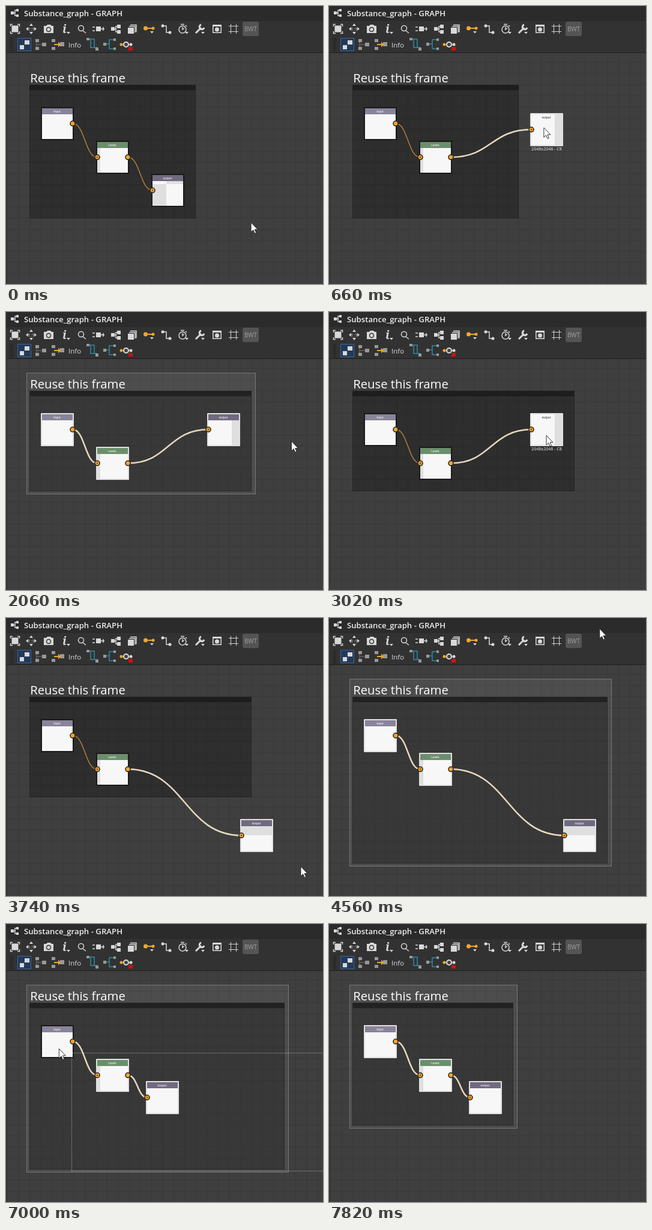
These frames come from a looping animation (528 by 462 pixels, 7.84 s). An HTML page:

```html
<!DOCTYPE html>
<html lang="en">
<head>
<meta charset="utf-8">
<style>
  html, body { margin: 0; width: 528px; height: 462px; overflow: hidden; background: #3f3f3f; }
  svg { display: block; font-family: "Open Sans", "Noto Sans", sans-serif; }
  .line { fill: none; stroke: #d8d8d8; stroke-width: 1.5; }
  .bold { stroke-width: 3; }
  .fill { fill: #d8d8d8; }
  .dim { fill: #999; }
  .cyan { fill: none; stroke: #2d8ca3; stroke-width: 1.5; }
  .amber { fill: #f0a72c; stroke: #f0a72c; stroke-width: 2; }
</style>
</head>
<body>
<svg width="528" height="462" viewBox="0 0 528 462">
  <defs>
    <pattern id="grid" x="2" y="1" width="18.46" height="18.46" patternUnits="userSpaceOnUse">
      <path d="M0 .5H18.46M.5 0V18.46" stroke="#383838"/>
    </pattern>
    <path id="menu" class="fill" d="M-3 0h6l-3 3.5z"/>
    <circle id="dot" r="2.5"/>
  </defs>
  <rect width="528" height="462" fill="#3f3f3f"/>
  <rect width="528" height="462" fill="url(#grid)"/>
  <path d="M.5 78V462" stroke="#2b2b2b"/>

  <g id="toolbar">
    <rect width="528" height="78" fill="#323232"/>
    <rect width="528" height="25" fill="#2b2b2b"/>
    <path d="M0 77.5H528" stroke="#1d1d1d"/>
    <path class="fill" d="M8 9h5v5h-5zM17 5h4v4h-4zM17 14h4v4h-4z"/>
    <path class="line" d="M12 11.5h3M19 7h-4v9h4"/>
    <text x="30" y="17" font-size="13.2" font-weight="600" fill="#eee">Substance_graph - GRAPH</text>

    <path class="line" d="M7.5 34v-3.5h3.5M19 30.5h3.5v3.5M22.5 42v3.5h-3.5M11 45.5h-3.5v-3.5"/>
    <path class="fill" d="M9.5 32.5h11v11h-11z"/>
    <path class="fill" d="M33 38l4-3v6zM51 38l-4-3v6zM42 29l3 4h-6zM42 47l3-4h-6z"/>
    <text x="42" y="41" font-size="8" text-anchor="middle" class="fill">1:1</text>
    <path class="fill" d="M63 33h4l2-2h5l2 2h3v12h-16z"/>
    <circle cx="71" cy="39" r="3.5" class="fill" stroke="#323232" stroke-width="1.5"/>
    <text x="94" y="45" font-family="Noto Serif, serif" font-size="19" font-style="italic" font-weight="600" class="fill">i</text>
    <use href="#menu" x="104" y="43"/>
    <path class="line" d="M128 41l5 4"/><circle cx="125" cy="37" r="4.5" class="line"/>
    <path class="fill" d="M150 34h8v8h-8z"/>
    <path class="line" d="M144 35h4M144 41h4M158 38h6M162 35v6"/>
    <path class="fill" d="M175 35h6v6h-6zM185 31h6v6h-6zM185 40h6v6h-6z"/>
    <path class="line" d="M181 38h3M186 34h-3v9h3"/>
    <path class="fill" d="M203 36h10v10h-10z"/>
    <path class="line" d="M205 34h10v10M207 31.5h10v12"/>
    <path class="amber" d="M232 37h13"/>
    <use href="#dot" x="232.5" y="37" class="amber" stroke-width="0"/>
    <use href="#dot" x="245" y="37" fill="#f0a72c"/>
    <use href="#menu" x="243" y="42"/>
    <path class="line" d="M261 33h6v11h6"/>
    <use href="#dot" x="261" y="33" class="fill"/><use href="#dot" x="273" y="44" class="fill"/>
    <circle cx="294" cy="39" r="6" class="line"/>
    <path class="line" d="M294 35v4l3-2M291 30.5h6M299 32l2 2"/>
    <use href="#menu" x="301" y="43"/>
    <path class="line bold" d="M316 45l9-9M325 31a4 4 0 1 0 5 5"/>
    <use href="#menu" x="328" y="43"/>
    <path class="fill" d="M344 31h15v14h-15z"/><path d="M345.5 34h12v9.5h-12z" fill="#3a3a3a"/>
    <circle cx="351.5" cy="39" r="3.5" class="fill"/>
    <path d="M374.5 30v16M383.5 30v16M371 33.5h16M371 42.5h16" stroke="#d0d0d0"/>
    <rect x="394" y="26" width="27" height="24" rx="3" fill="#545454"/>
    <text x="407.5" y="41.5" font-size="10" text-anchor="middle" fill="#a0a0a0">BWT</text>

    <path d="M8 53v23M11 53v23" stroke="#171717" stroke-dasharray="1.5 1"/>
    <rect x="19.5" y="53.5" width="22" height="21" fill="#23395a" stroke="#3b659d"/>
    <path class="fill" d="M31 57h8v7h-8zM23 65h7v7h-7z"/>
    <path class="dim" d="M49 55h6v5h-6zM49 68h6v5h-6zM60 61h7v6h-7z"/>
    <path d="M51 60v8M51 64h9" stroke="#777"/>
    <path class="dim" d="M76 55h6v5h-6zM76 68h6v5h-6zM90 60h7v7h-7z"/>
    <path class="amber" d="M80 64h10M88 62l2 2-2 2z"/>
    <text x="104" y="69" font-size="11.5" fill="#dcdcdc">Info</text>
    <path class="cyan" d="M136 55h11v14h5M141 55v14h6M182 56h-10v15h10M172 63h-7"/>
    <path class="dim" d="M134 53h5v4h-5zM149 69h5v5h-5zM162 61h5v5h-5zM179 54h4v4h-4zM179 69h4v4h-4z"/>
    <path d="M191 64h18" stroke="#e09a30"/>
    <use href="#dot" x="192" y="64" fill="#f0a72c"/><use href="#dot" x="208" y="64" class="fill"/>
    <circle cx="200" cy="64" r="4" fill="#444" stroke="#ddd" stroke-width="2"/>
    <path d="M204 68h7v6h-7z" fill="#d01010"/>
  </g>
  <g id="scene"></g>
</svg>
<script>
const LOOP = 7840, UNIT = 18.46, ORIGIN = [39, 131], SIZE = 55;
const SWEEP = 490, FIT = 650, EXIT = 520;
const scene = document.getElementById('scene');

// Each round: drag the output node, sweep a marquee over everything, fit the frame, leave.
const first = { spot: [11, 8], split: [25, 17] };
const rounds = [
  { enter: 0, from: [409, 360], grip: [28, 28], sweep: 1276, corner: [461, 404], home: [36, 97], exit: [532, 230],
    drags: [{ grab: 340, drop: 760, spot: [16, 2], split: [41, 55] }] },
  { enter: 2460, from: [496, 332], grip: [27, 37], sweep: 3780, corner: [491, 413], home: [20, 97], exit: [510, 7],
    drags: [{ grab: 3030, drop: 3440, spot: [19, 11], split: [0, 27] }] },
  { enter: 4880, from: [526, 325], grip: [29, 28], sweep: 6580, corner: [530, 410], home: [16, 188], exit: [16, 188],
    drags: [{ grab: 5260, drop: 5560, spot: [15, 8], split: [38, 16] },
            { grab: 5560, drop: 6190, spot: [10.5, 7], split: [55, 55] }] }
];

const glide = p => 1 - (1 - p) ** 2;
const arc = (p, axis) => axis ? 1 - (1 - p) ** 1.25 : p;
const place = spot => spot.map((v, k) => Math.ceil(ORIGIN[k] + v * UNIT - .1));

// Turn the rounds into pointer moves
const track = [];
let held = first;
for (const r of rounds) {
  let at = r.from;
  const move = (start, end, to, ease = glide) => {
    track.push({ start, end, from: at, to, ease });
    at = to;
  };
  const gripOn = stop => place(stop.spot).map((v, k) => v + r.grip[k]);
  move(r.enter, r.drags[0].grab - 30, gripOn(held));
  for (const d of r.drags) {
    d.before = held;
    move(d.grab, d.drop, gripOn(d));
    held = d;
  }
  move(r.sweep - 180, r.sweep - 40, r.corner);
  move(r.sweep, r.sweep + SWEEP, r.home, arc);
  move(r.sweep + EXIT, r.sweep + EXIT + 400, r.exit);
}

function pointer(t) {
  const { start, end, from, to, ease } = track.findLast(m => m.start <= t);
  const p = Math.min(1, (t - start) / (end - start));
  return from.map((v, k) => v + (to[k] - v) * ease(p, k));
}

function outputState(t) {
  const r = rounds.findLast(r => r.enter <= t);
  const d = rounds.flatMap(r => r.drags).findLast(d => d.grab <= t);
  if (!d || t >= d.drop) return d || first;
  const p = pointer(t), base = place(d.before.spot);
  const spot = d.before.spot.map((v, k) => v + Math.round((p[k] - r.grip[k] - base[k]) / UNIT * 2) / 2);
  const split = (t - d.grab) / (d.drop - d.grab) > .5 ? d.split : d.before.split;
  return { spot, split };
}

// The frame keeps one grid unit of padding around the nodes
function fittedFrame(t) {
  const done = rounds.findLast(r => r.sweep + FIT <= t);
  const [gx, gy] = (done ? done.drags.at(-1) : first).spot;
  return { x: ORIGIN[0], y: ORIGIN[1], w: Math.floor((gx + 4) * UNIT), h: Math.floor((Math.max(5, gy) + 4) * UNIT) };
}

const hits = (a, b) => a.x < b.x + b.w && b.x < a.x + a.w && a.y < b.y + b.h && b.y < a.y + a.h;

const rect = (x, y, w, h, fill, more = '') =>
  `<rect x="${x}" y="${y}" width="${Math.max(0, w)}" height="${Math.max(0, h)}" fill="${fill}" ${more}/>`;

const label = (x, y, size, fill, text) =>
  `<text x="${x}" y="${y}" font-size="${size}" font-weight="600" text-anchor="middle" fill="${fill}">${text}</text>`;

function drawFrame({ x, y, w, h, on }) {
  const glow = on ? rect(x - 4.5, y - 29.5, w + 12, h + 35, '#fff',
    'fill-opacity=".07" stroke="#fff" stroke-opacity=".27"') : '';
  return glow + rect(x + .5, y + .5, w, h, '#000', 'fill-opacity=".27" stroke="#222" stroke-opacity=".7"') +
    rect(x, y, w + 1, 9, on ? '#222' : '#1e1e1e') +
    `<text x="40.2" y="127" font-size="20.3" fill="#fff">Reuse this frame</text>`;
}

function drawEdge(a, b) {
  const x = a.x + 53, y = a.y + 27.3, x2 = b.x + 2, y2 = b.y + 27.3, m = (x + x2) / 2, on = a.on || b.on;
  return `<path d="M${x} ${y}C${m} ${y} ${m} ${y2} ${x2} ${y2}" fill="none"
    stroke="${on ? '#e8d9be' : '#b5873f'}" stroke-width="${on ? 2.5 : 1.4}"/>`;
}

function drawNode({ x, y, name, color, split, on, hover }) {
  const l = 2, r = 53, top = hover ? l : 12;
  const cx = Math.min(r, Math.max(l, split[0])), cy = Math.min(r, Math.max(top, split[1]));
  return rect(x, y, SIZE, SIZE, on ? '#e0e0e0' : '#1b1b1b', 'rx="1"') +
    rect(x + l, y + top, r - l, r - top, '#f7f7f7') +
    rect(x + cx, y + top, r - cx, cy - top, '#dfdfdf') +
    rect(x + l, y + cy, cx - l, r - cy, '#dfdfdf') +
    (hover ? label(x + 27.5, y + 61.5, 7.1, '#c4c4c4', '2048x2048 - C8') : rect(x + l, y + l, r - l, 10, color)) +
    label(x + 27, y + 8.7, 4.5, hover ? '#444' : '#f0f0f0', name);
}

function drawPort(n, dx) {
  const at = `cx="${n.x + dx}" cy="${n.y + 27.3}"`;
  return `<circle ${at} r="4" fill="#f2a42f" stroke="#2a2622" stroke-width="1.6"/>` +
    (dx < 9 ? `<circle ${at} r="1.2" fill="#6b4715"/>` : '');
}

function drawMarquee({ x, y, w, h }) {
  const d = `M${x + .5} ${y + h + .5}h${w}v${-h}` + (w > 24 ? `h${-w}v${h}` : '');
  return `<path d="${d}" fill="none" stroke="#d0d0d0" stroke-dasharray="1 2"/>`;
}

const drawPointer = ([x, y]) => `<path transform="translate(${x} ${y})"
  d="M0 0V16L3.7 12.6 6.2 18.3 8.6 17.2 6.1 11.7H11Z" fill="#fff" stroke="#222" stroke-width=".9"/>`;

function makeNode(spot, name, color, split) {
  const [x, y] = place(spot);
  return { x, y, w: SIZE - 6, h: SIZE - 6, name, color, split };
}

function draw(t) {
  const i = rounds.findLastIndex(r => r.enter <= t), r = rounds[i];
  const { spot, split } = outputState(t);
  const input = makeNode([1, 2], 'Input', '#89839b', [0, 0]);
  const levels = makeNode([6, 5], 'Levels', '#6a8f6c', [7, 0]);
  const output = makeNode(spot, 'output', '#706a80', split);
  const nodes = [input, levels, output], frame = fittedFrame(t), tip = pointer(t);

  const sweeping = t >= r.sweep && t < r.sweep + SWEEP;
  const kept = t >= r.sweep + SWEEP || i > 0 && t < r.enter + 60;
  let box;
  if (sweeping) {
    const [x, y] = pointer(Math.max(r.sweep, t - 20)).map(Math.round);
    box = { x, y, w: r.corner[0] - x, h: r.corner[1] - y };
  }
  for (const item of [...nodes, frame]) item.on = kept || !!box && hits(item, box);
  output.on ||= t >= r.drags[0].grab - 30 && t < r.sweep;

  const visible = t < r.sweep + EXIT + 400;
  output.hover = visible && t < r.sweep && hits(output, { x: tip[0], y: tip[1], w: 0, h: 0 });

  scene.innerHTML = drawFrame(frame) + drawEdge(input, levels) + drawEdge(levels, output) +
    nodes.map(drawNode).join('') +
    drawPort(input, 53) + drawPort(levels, 2) + drawPort(levels, 53) + drawPort(output, 2) +
    (box ? drawMarquee(box) : '') + (visible ? drawPointer(tip) : '');
}

function tick() {
  draw(performance.now() % LOOP);
  requestAnimationFrame(tick);
}
tick();
</script>
</body>
</html>
```
